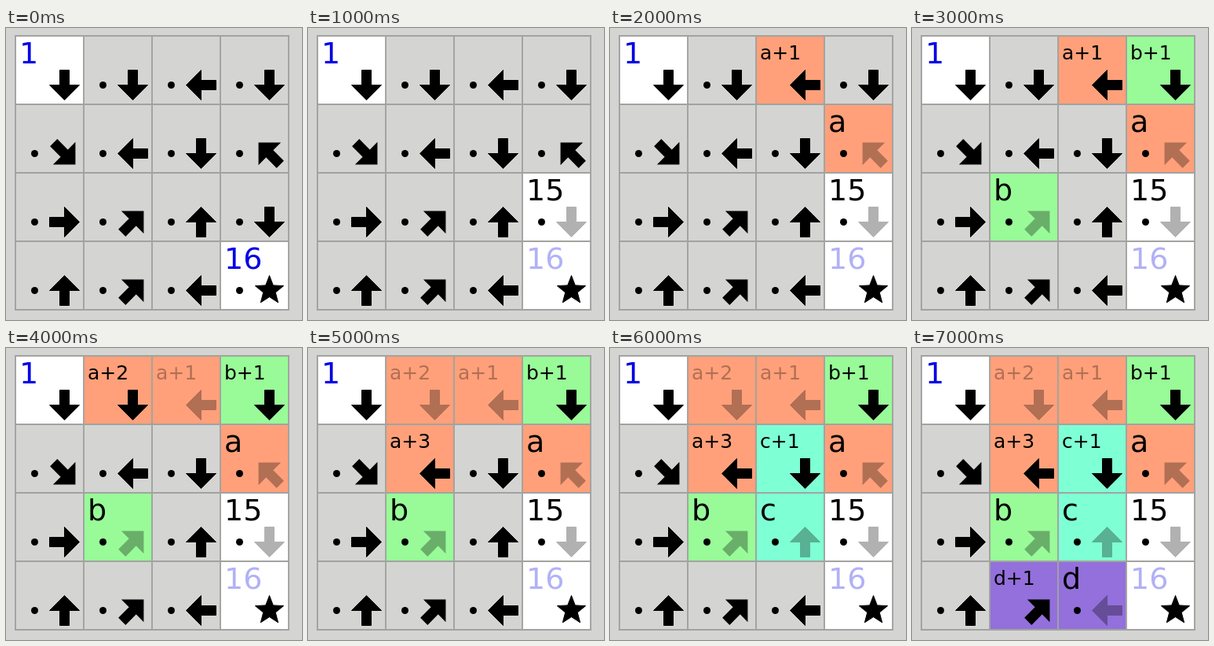
An HTML page that plays this animation: 377x371 px, repeating every 8 s.

```html
<!DOCTYPE html>
<html lang="en">
<head>
<meta charset="utf-8">
<title>Arrow chain puzzle</title>
<style>
  html, body { margin: 0; height: 100%; overflow: hidden; background: #d4d5d2; }
  svg { display: block; width: 377px; height: 371px; }
  text { font-family: "DejaVu Sans", sans-serif; }
  path { stroke: #000; }
  .grid { fill: none; stroke: #a2a3a0; stroke-width: 1.9; }
</style>
</head>
<body>
<svg id="board" viewBox="0 0 377 371"></svg>
<script>
const SIZE = 87, LEFT = 12, TOP = 10, STEP_MS = 1000, STEPS = 8;
const COLORS = { a: '#ffa07a', b: '#98fb98', c: '#7fffd4', d: '#9370db' };
const NEVER = Infinity;

// Arrow directions in eighths of a turn, clockwise from up.
const DIRECTIONS = [4, 4, 6, 4, 3, 6, 4, 7, 2, 1, 0, 4, 0, 1, 6, null];

// Cell index: [label, step linked from a predecessor, step linked to a successor]
const LABELS = {
  0: ['1', 0, NEVER],
  1: ['a+2', 4, 5],
  2: ['a+1', 2, 4],
  3: ['b+1', 3, NEVER],
  5: ['a+3', 5, NEVER],
  6: ['c+1', 6, NEVER],
  7: ['a', NEVER, 2],
  9: ['b', NEVER, 3],
  10: ['c', NEVER, 6],
  11: ['15', NEVER, 1],
  13: ['d+1', 7, NEVER],
  14: ['d', NEVER, 7],
  15: ['16', 1, NEVER]
};

const ARROW = 'M0-19L19 0H6V19H-6V0H-19Z';
const STAR = 'M' + Array.from({ length: 10 }, (_, i) => {
  const radius = i % 2 ? 19 * 3 / 7 : 19, angle = i * Math.PI / 5;
  return [radius * Math.sin(angle), -radius * Math.cos(angle)].map(v => v.toFixed(2));
}).join('L') + 'Z';

const opacity = dim => dim ? 0.3 : 1;

function drawCell(direction, index, step) {
  const [label, from, to] = LABELS[index] || ['', NEVER, NEVER];
  const isEnd = label === '1' || label === '16';
  const isStar = direction === null;
  const hasPrevious = step >= from, hasNext = step >= to;
  let out = '';
  if (label && (isEnd || hasPrevious || hasNext)) {
    const long = label.length > 2;
    const dim = hasPrevious && (hasNext || isStar);
    out += `<rect width="${SIZE}" height="${SIZE}" fill="${COLORS[label[0]] || '#fff'}"/>
      <text x="5" y="${long ? 30.3 : 35}" font-size="${long ? 25 : 38}"
        fill="${isEnd ? '#0000e6' : '#000'}" opacity="${opacity(dim)}">${label}</text>`;
  }
  if (!hasPrevious) out += '<circle cx="24.5" cy="62.5" r="4.5"/>';
  out += `<path d="${isStar ? STAR : ARROW}" opacity="${opacity(hasNext)}"
    transform="translate(62.5 62.5) rotate(${direction * 45})"/>`;
  const x = LEFT + index % 4 * SIZE, y = TOP + Math.floor(index / 4) * SIZE;
  return `<g transform="translate(${x} ${y})">${out}</g>`;
}

function drawGrid() {
  let d = '';
  for (let i = 0; i <= 4; i++) {
    d += `M${LEFT + i * SIZE} ${TOP - 1}v${4 * SIZE + 2}M${LEFT - 1} ${TOP + i * SIZE}h${4 * SIZE + 2}`;
  }
  return `<path class="grid" d="${d}"/>`;
}

const board = document.getElementById('board');
const start = performance.now();
let shown = -1;

function render() {
  const step = Math.floor((performance.now() - start) / STEP_MS) % STEPS;
  if (step !== shown) {
    shown = step;
    board.innerHTML = DIRECTIONS.map((dir, i) => drawCell(dir, i, step)).join('') + drawGrid();
  }
  requestAnimationFrame(render);
}
render();
</script>
</body>
</html>
```
